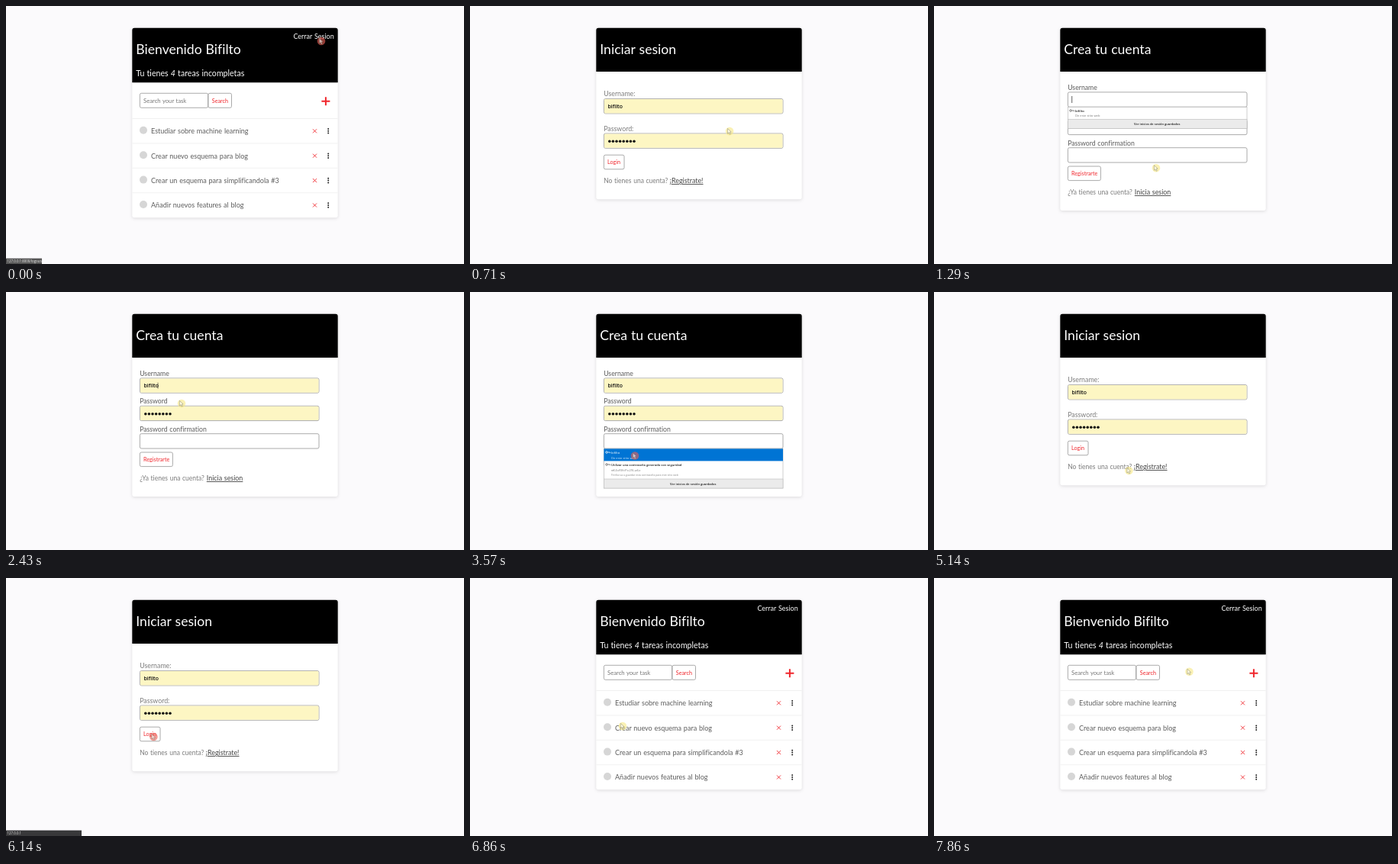
An HTML page for the animation above (8 s loop, 600 by 338 pixels).

```html
<!DOCTYPE html>
<html lang="es">
<head>
<meta charset="utf-8">
<title>Tareas</title>
<style>
html, body { margin: 0; width: 100%; height: 100%; overflow: hidden; background: #fbfafc; }
svg { display: block; width: 100vw; height: 100vh; font-family: Lato, "Open Sans", sans-serif;
  font-variant-ligatures: none; word-spacing: .03em; }
.ui { font-family: "Open Sans", sans-serif; word-spacing: 0; }
.mono { font-family: "Noto Sans Mono", monospace; }
.card { filter: drop-shadow(0 1px 2px rgba(0, 0, 0, .13)); }
</style>
</head>
<body>
<svg id="stage" viewBox="0 0 600 338"></svg>
<script>
const USER = 'bifilto';
const RED = '#f0262c', GREY = '#5c5c5c', PALE = '#7c7c7c', YELLOW = '#fdf6c3';
const LOOP = 8000, TICK = LOOP / 56;

const text = (x, y, size, fill, str, attrs = '') =>
  `<text x="${x}" y="${y}" font-size="${size}" fill="${fill}" ${attrs}>${str}</text>`;
const rect = (x, y, w, h, fill, attrs = '') =>
  `<rect x="${x}" y="${y}" width="${w}" height="${h}" fill="${fill}" ${attrs}/>`;
const circle = (x, y, r, fill) => `<circle cx="${x}" cy="${y}" r="${r}" fill="${fill}"/>`;
const stroke = (d, color, width) => `<path d="${d}" fill="none" stroke="${color}" stroke-width="${width}"/>`;
const group = (id, content) => `<g id="${id}">${content}</g>`;
const box = (x, y, w, h) => rect(x, y, w, h, '#fff', 'rx="2" stroke="#969696" stroke-width=".8"');
const field = y => box(175.4, y, 234.6, 19.3);
const autofill = y => rect(175.9, y + .5, 233.6, 18.3, YELLOW, 'rx="1.5"');
const typed = y => text(180.5, y, 6.9, '#111', USER, 'class="ui" font-weight="600"');
const dots = y => Array.from({ length: 8 }, (_, i) => circle(182.8 + i * 4.6, y, 1.75, '#111')).join('');
const button = (y, w, label) => box(175.4, y, w, 18.6) + text(180, y + 12, 7.2, RED, label);
const link = (x, y, str) => text(x, y, 8.9, '#444', str, 'text-decoration="underline"');
const key = (y, color) =>
  `<circle cx="179" cy="${y}" r="1.3" fill="none" stroke="${color}" stroke-width=".7"/>` +
  stroke(`M180.3 ${y}H183.6v1.2`, color, .7);

const card = (bottom, headBottom, title) =>
  rect(165.3, 28.7, 269.4, bottom - 28.7, '#fff', 'rx="3" class="card"') +
  `<path d="M165.3 ${headBottom}V31.7q0-3 3-3H431.7q3 0 3 3V${headBottom}z"/>` +
  text(170.3, 63.3, 17.6, '#fff', title);

const tasks = ['Estudiar sobre machine learning', 'Crear nuevo esquema para blog',
  'Crear un esquema para simplificandola #3', 'Añadir nuevos features al blog'];

const taskRow = (label, i) => {
  const y = 163.5 + i * 32.4;
  return stroke(`M165.3 ${y - 16}H434.7`, '#eee', .8) +
    circle(180, y - .7, 5, '#d6d6d6') +
    text(190, y + 3.6, 9.05, GREY, label) +
    stroke(`M402 ${y - 2.2}l5 5m0-5l-5 5`, RED, .9) +
    [-2.8, 0, 2.8].map(d => circle(422.2, y + .3 + d, 1, '#222')).join('');
};

const home = card(277.2, 100.3, 'Bienvenido ' + USER[0].toUpperCase() + USER.slice(1)) +
  text(429.7, 43, 9, '#fff', 'Cerrar Sesion', 'text-anchor="end"') +
  text(170.3, 92, 10.6, '#fff', 'Tu tienes <tspan font-style="italic">4</tspan> tareas incompletas') +
  box(175.4, 114.3, 89.2, 19) + box(265, 114.3, 30.5, 19) +
  text(180, 126.8, 7.7, '#777', 'Search your task') +
  text(269.8, 126.6, 7.2, RED, 'Search') +
  stroke('M413.4 124.8H424.4M418.9 119.3V130.3', RED, 2) +
  tasks.map(taskRow).join('');

const register = card(268, 86, 'Crea tu cuenta') +
  ['Username', 'Password', 'Password confirmation'].map((label, i) =>
    text(175.2, 109.7 + i * 36.5, 8.7, GREY, label) + field(112.9 + i * 36.4)).join('') +
  button(210, 43, 'Registrarte') +
  text(175.2, 247, 8.5, PALE, '¿Ya tienes una cuenta?') + link(262.8, 247, 'Inicia sesion');

const login = card(253.2, 86, 'Iniciar sesion') +
  text(175.2, 118.3, 8.8, PALE, 'Username:') + field(121.6) + autofill(121.6) + typed(133.9) +
  text(175.2, 163.8, 8.8, PALE, 'Password:') + field(167) + autofill(167) + dots(177.2) +
  button(195.2, 26.6, 'Login') +
  text(175.2, 232, 8.5, PALE, 'No tienes una cuenta?') + link(261.8, 232, '¡Registrate!');

const popupFrame = (y, h) => rect(175.4, y, 234.6, h, '#fff', 'stroke="#bbb" stroke-width=".7"');
const popupFoot = y => rect(175.4, y, 234.6, 12, '#ebebeb', 'stroke="#bbb" stroke-width=".6"') +
  text(292.3, y + 7.6, 4, '#222', 'Ver inicios de sesión guardados', 'text-anchor="middle" font-weight="600"');

const userPopup = `<g class="ui">${popupFrame(132.4, 28)}${key(137, '#555')}` +
  text(185, 138.6, 4.2, '#222', USER, 'font-weight="600"') +
  text(185, 145.4, 4.1, '#777', 'De este sitio web') + popupFoot(148.4) + '</g>';

const confirmPopup = `<g class="ui">${popupFrame(205.4, 51.6)}` +
  rect(175.4, 205.4, 234.6, 16, '#0074d4') + key(210, '#fff') +
  text(185, 211.6, 4.2, '#fff', USER) + text(185, 218.6, 4.1, '#cfe5f8', 'De este sitio web') +
  key(226, '#555') +
  text(185, 227.8, 4, '#222', 'Utilizar una contraseña generada con seguridad', 'font-weight="600"') +
  text(185, 234.8, 4.3, '#888', 'mK4vR8tPx29Lw6z', 'class="mono"') +
  text(185, 241.4, 3.4, '#888', 'Firefox va a guardar esta contraseña para este sitio web') +
  popupFoot(245) + '</g>';

const status = (path, width, fill) => rect(0, 330.6, width, 7.4, fill) +
  text(1.5, 336, 4.4, '#eee', '127.0.0.1' + path, 'class="ui"');

const layers = {
  home, register, login,
  filled: autofill(112.9) + typed(125.2) + autofill(149.3) + dots(159.7),
  confirmed: autofill(185.7) + dots(196.1),
  emptyCaret: stroke('M180.7 118V127', '#222', .7),
  filledCaret: stroke('M199 118.7V126.6', '#222', .6),
  userPopup, confirmPopup,
  logoutUrl: status(':8000/logout/', 47, '#555'),
  registerUrl: status(':8000/register/', 49, '#555'),
  loginUrl: status(':8000/login/', 44, '#666'),
  waiting: status('', 99, '#38383a')
};

// Periods in ms during which each layer is shown.
const shown = {
  home: [[0, 290], [6430, LOOP]],
  login: [[290, 1000], [4860, 6430]],
  register: [[1000, 4860]],
  userPopup: [[1140, 2140]],
  emptyCaret: [[1140, 2140]],
  filled: [[2140, 4860]],
  filledCaret: [[2140, 3000]],
  confirmPopup: [[3140, 3710]],
  confirmed: [[3710, 4860]],
  logoutUrl: [[0, 290]],
  registerUrl: [[710, 1000]],
  loginUrl: [[4430, 4860]],
  waiting: [[5860, 6430]]
};
const pressed = [[0, 290], [860, 1000], [2000, 2140], [3000, 3140], [3570, 3710], [4570, 4860], [5860, 6430]];

// Pointer path: time, x, y.
const path = [
  [0, 413, 46], [290, 411, 50], [430, 384, 105], [710, 297, 222], [860, 289, 229], [1000, 289, 228],
  [1290, 291, 212], [1430, 280, 195], [1860, 224, 143], [2140, 224, 142], [2430, 230, 146],
  [2570, 228, 156], [3000, 222, 195], [3430, 216, 213], [3710, 216, 216], [4000, 230, 221],
  [4430, 285, 246], [4570, 286, 248], [4860, 286, 247], [5710, 194, 208], [6430, 193, 208],
  [6860, 200, 194], [7000, 203, 188], [7290, 245, 105], [7430, 284, 62], [7570, 312, 78],
  [7710, 330, 112], [7860, 334.5, 123]
];

const stage = document.getElementById('stage');
stage.innerHTML = Object.entries(layers).map(([id, content]) => group(id, content)).join('') +
  group('pointer', '<circle id="halo" r="5.3"/>' +
    '<path d="M-2.6-3.6V3l1.6-1.4 1.1 2.5 1.2-.6L.2 1.1l2-.2z" fill="#fff" fill-opacity=".6" ' +
    'stroke="#665" stroke-opacity=".75" stroke-width=".5"/>');
const byId = id => document.getElementById(id);

const within = (periods, t) => periods.some(([from, to]) => t >= from - 4 && t < to - 4);

function pointerAt(t) {
  const i = path.findIndex(p => p[0] > t);
  if (i < 0) return path[path.length - 1].slice(1);
  const [t0, x0, y0] = path[i - 1], [t1, x1, y1] = path[i];
  const u = (t - t0) / (t1 - t0);
  return [x0 + (x1 - x0) * u, y0 + (y1 - y0) * u];
}

function draw(now) {
  const t = Math.floor((now % LOOP + 3) / TICK) % 56 * TICK;
  for (const id in shown) byId(id).style.display = within(shown[id], t) ? '' : 'none';
  byId('pointer').setAttribute('transform', `translate(${pointerAt(t)})`);
  byId('halo').setAttribute('fill', within(pressed, t) ? 'rgba(236,95,85,.62)' : 'rgba(247,232,130,.6)');
}

const start = performance.now();
function frame() {
  draw(performance.now() - start);
  requestAnimationFrame(frame);
}
frame();
</script>
</body>
</html>
```
